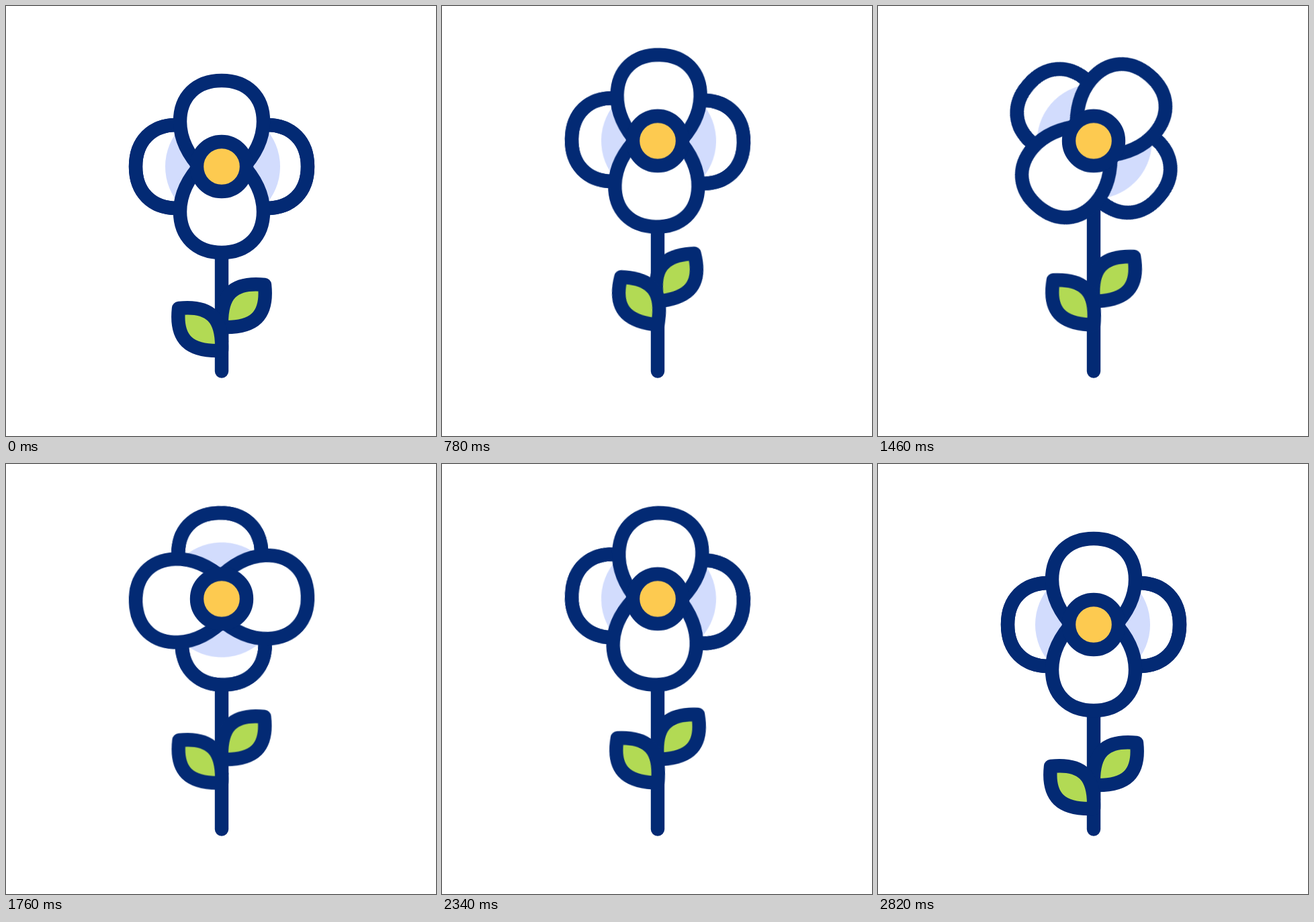
An HTML page that plays this animation: 640x640 px, repeating every 3020 ms.

```html
<!DOCTYPE html>
<html lang="en">
<head>
<meta charset="utf-8">
<title>Flower</title>
<style>
  html, body { margin: 0; width: 100%; height: 100%; overflow: hidden; background: #fff; }
  svg { display: block; width: 100%; height: 100%; }

  .ink { stroke: #032a74; stroke-width: 20.4; stroke-linecap: round; stroke-linejoin: round; }
  .rise, .spin, .leaf { animation: 3020ms infinite; }
  .rise { animation-name: rise; }
  .spin { animation-name: spin; }
  .leaf { animation-name: sway; fill: #b2da54; }

  /* up 420-780 ms, down 2340-2820 ms */
  @keyframes rise {
    0%, 13.907% { transform: translateY(0); animation-timing-function: cubic-bezier(.33, 0, .67, 1); }
    25.828%, 77.483% { transform: translateY(-38.3px); animation-timing-function: cubic-bezier(.33, 0, .67, 1); }
    93.377%, 100% { transform: translateY(0); }
  }
  /* one and a half turns, 600-2820 ms */
  @keyframes spin {
    0%, 19.868% { transform: rotate(0deg); animation-timing-function: cubic-bezier(.967, 0, .655, 1); }
    93.377%, 100% { transform: rotate(540deg); }
  }
  @keyframes sway {
    0%, 13.907% { transform: rotate(0deg); animation-timing-function: ease-in-out; }
    25.828% { transform: rotate(-8deg); animation-timing-function: ease-in-out; }
    38.742% { transform: rotate(7deg); animation-timing-function: ease-in-out; }
    51.656% { transform: rotate(-5deg); animation-timing-function: ease-in-out; }
    64.901% { transform: rotate(4deg); animation-timing-function: ease-in-out; }
    78.146% { transform: rotate(-3.5deg); animation-timing-function: ease-in-out; }
    93.377%, 100% { transform: rotate(0deg); }
  }
</style>
</head>
<body>
<svg viewBox="0 0 640 640">
  <defs>
    <path id="petal" d="M28 6C49 -16 62 -40 62 -67C62 -104 38 -128 0 -128S-62 -104 -62 -67C-62 -40 -49 -16 -28 6Z"/>
    <path id="leaf" d="M0 0C-2 -48 16 -68 64 -63C69 -17 49 2 0 0Z"/>
    <clipPath id="sides">
      <use href="#petal" transform="rotate(90)"/>
      <use href="#petal" transform="rotate(-90)"/>
    </clipPath>
  </defs>

  <path class="ink" d="M321 460V543.5"/>
  <g class="rise">
    <path class="ink" d="M321 239V500"/>
    <g transform="translate(321 478)"><use class="leaf ink" href="#leaf"/></g>
    <g transform="translate(321 513) scale(-1 1)"><use class="leaf ink" href="#leaf"/></g>

    <g transform="translate(321 239)">
      <g class="spin">
        <g class="ink" fill="#fff">
          <use href="#petal" transform="rotate(90)"/>
          <use href="#petal" transform="rotate(-90)"/>
        </g>
        <g clip-path="url(#sides)"><circle cx="1.5" r="85.5" fill="#d2dcfd"/></g>
        <g class="ink" fill="none">
          <use href="#petal" transform="rotate(90)"/>
          <use href="#petal" transform="rotate(-90)"/>
        </g>
        <g class="ink" fill="#fff">
          <use href="#petal"/>
          <use href="#petal" transform="rotate(180)"/>
        </g>
      </g>
      <circle class="ink" r="37" fill="#fdca50"/>
    </g>
  </g>
</svg>
</body>
</html>
```
